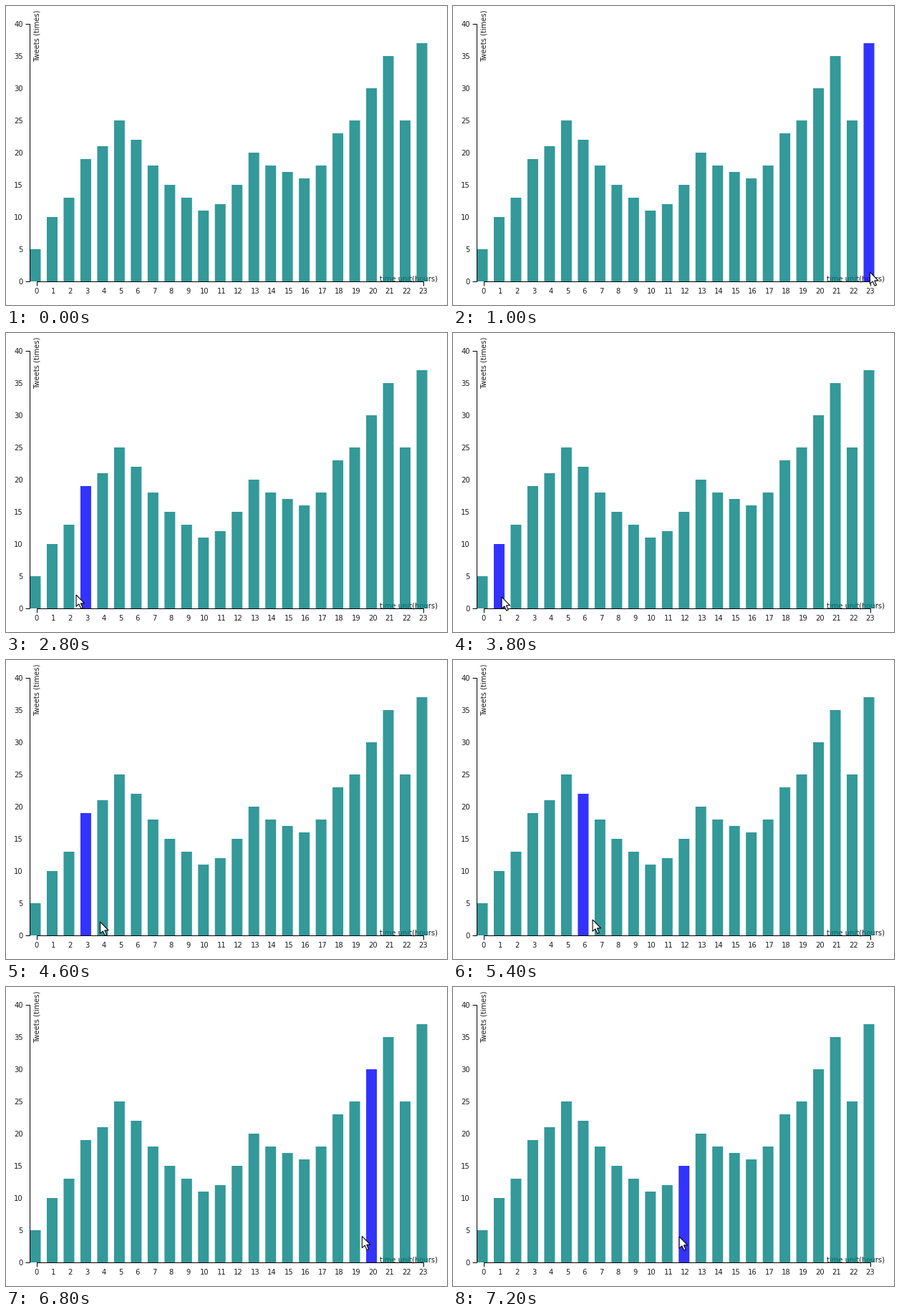
Write a matplotlib script that moves like this. It is 616x418 px and loops after 7.4 s.

```python
import numpy as np
import matplotlib.pyplot as plt
from matplotlib.animation import FuncAnimation
from matplotlib.patches import Polygon, Rectangle

W, H, DPI = 616, 418, 64
PX = 72 / DPI  # points per pixel
STEP, FRAMES = 200, 37

TEAL, BLUE, INK = "#008080", "#0000ff", "#1c1c1c"
COUNTS = [5, 10, 13, 19, 21, 25, 22, 18, 15, 13, 11, 12,
          15, 20, 18, 17, 16, 18, 23, 25, 30, 35, 25, 37]
LEFT, RIGHT, BASE, UNIT = 43, 583, 385, 9
PITCH = (RIGHT - LEFT) / (len(COUNTS) - 1)
BAR_X, BAR_W = 33.5, 15

# Turning points of the pointer: time in ms, x, y
TIMES, XS, YS = np.array([
    (200, 600, 396), (1200, 578, 366), (1600, 482, 339), (2400, 113, 362),
    (2800, 98, 366), (3400, 42, 368), (3800, 68, 369), (5400, 195, 363),
    (6200, 514, 347), (6600, 588, 348), (7200, 316, 349),
]).T
HOVER_LAG, MAX_TRAIL = 165, 13.5
ARROW = np.array([(0, 0), (0, 16.4), (3.8, 12.9), (6.7, 19.2), (9.2, 18.2),
                  (6.4, 11.9), (11.6, 11.9)])

fig = plt.figure(figsize=(W / DPI, H / DPI), dpi=DPI, facecolor="white")
ax = fig.add_axes([0, 0, 1, 1])
ax.set_xlim(0, W)
ax.set_ylim(H, 0)
ax.axis("off")


def label(x, y, text, ha, **kw):
    ax.text(x, y, text, ha=ha, va="baseline", family="DejaVu Sans",
            fontsize=10 * PX, color=INK, zorder=1, **kw)


def axis_line(points):
    x, y = zip(*points)
    ax.plot(x, y, color="black", lw=PX, solid_capstyle="butt",
            solid_joinstyle="miter", snap=True, zorder=3)


def pointer(t):
    return np.array([np.interp(t, TIMES, XS), np.interp(t, TIMES, YS)])


axis_line([(27, 25), (33, 25), (33, BASE), (27, BASE)])
axis_line([(LEFT, 391), (LEFT, BASE), (RIGHT, BASE), (RIGHT, 391)])
for v in range(0, 41, 5):
    label(24, BASE - v * UNIT + 3.6, str(v), "right")
for i in range(len(COUNTS)):
    label(LEFT - 0.2 + i * PITCH, 401.5, str(i), "center")
label(46.5, 5.5, "Tweets (times)", "right", rotation=90,
      rotation_mode="anchor")
label(603, 385, "time unit(hours)", "right")

bars = [ax.add_patch(Rectangle((BAR_X + i * PITCH, BASE - n * UNIT), BAR_W,
                               n * UNIT, fc=TEAL, ec="none", alpha=0.8,
                               snap=False, zorder=2))
        for i, n in enumerate(COUNTS)]
cursor = ax.add_patch(Polygon(ARROW, fc="white", ec="black", lw=1.1 * PX,
                              joinstyle="miter", zorder=4))


def draw(frame):
    t = frame * STEP
    shown = t >= TIMES[0]
    x, y = pointer(t)
    cursor.set_visible(shown)
    cursor.set_xy(ARROW + (x, y))
    # The highlight trails a little behind the pointer.
    x += np.clip(pointer(t - HOVER_LAG)[0] - x, -MAX_TRAIL, MAX_TRAIL)
    for bar in bars:
        left, top = bar.get_xy()
        hit = shown and left <= x <= left + BAR_W and top <= y <= BASE
        bar.set_facecolor(BLUE if hit else TEAL)
    return [*bars, cursor]


anim = FuncAnimation(fig, draw, frames=FRAMES, interval=STEP,
                     init_func=lambda: draw(0), repeat=True, repeat_delay=0)
plt.show()
```
